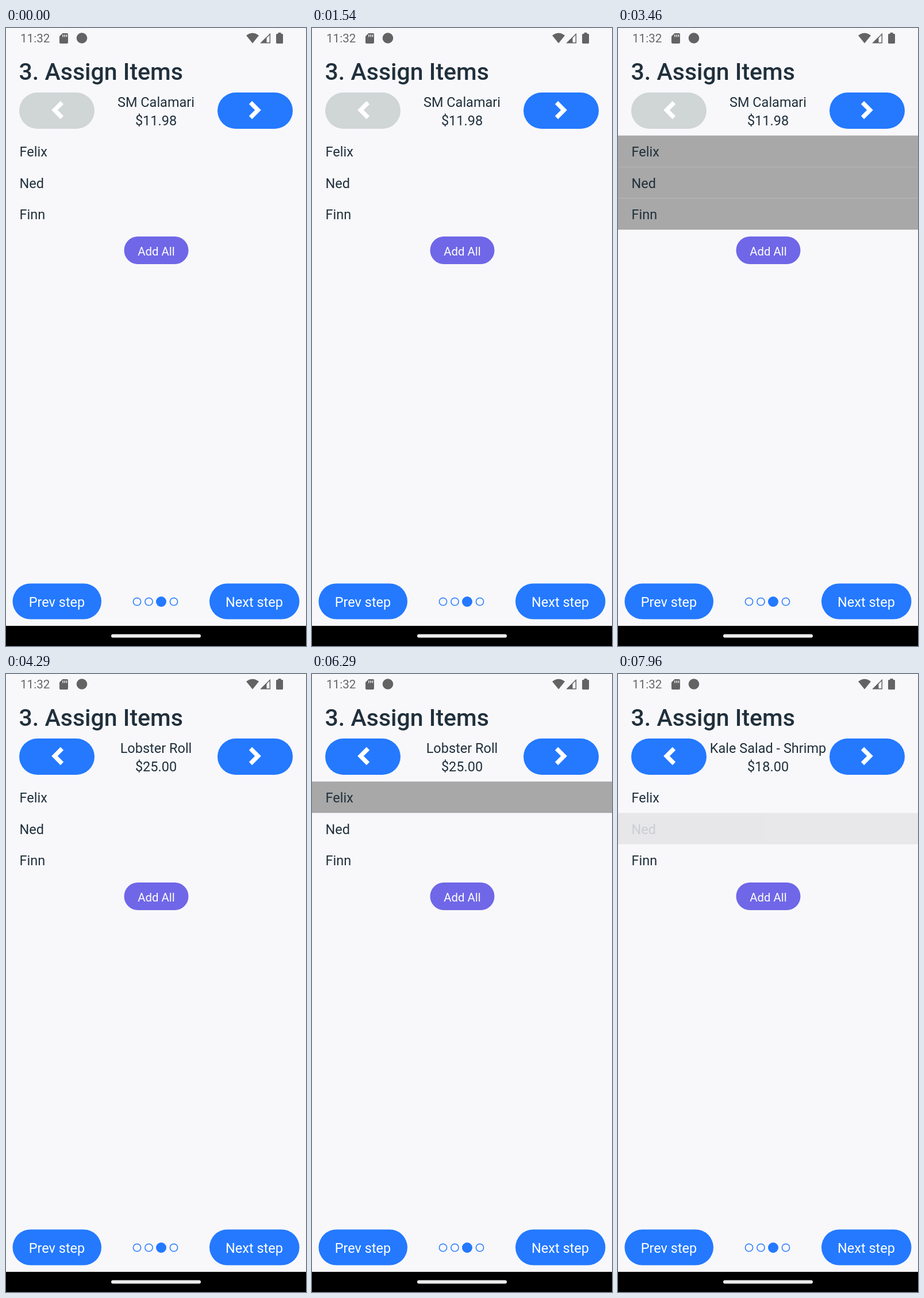
An HTML page that plays this animation: 522 px wide and 1073 px high, repeating every 8 s.

```html
<!DOCTYPE html>
<html lang="en">
<head>
<meta charset="utf-8">
<title>Assign Items</title>
<style>
  html, body { margin: 0; width: 100%; height: 100%; overflow: hidden; background: #f8f8fb; }
  svg { display: block; width: 100%; height: 100%; }
  text { font: 23.5px Roboto, Arial, sans-serif; fill: #20303c; }
  .title { font-size: 41px; font-weight: 500; }
  .clock { font-size: 20.6px; fill: #666; }
  .mid { text-anchor: middle; }
  .light { fill: #fff; }
  .small { font-size: 20.4px; }
  .blue { fill: #2479ff; }
  .chevron { fill: none; stroke: #fff; stroke-width: 7.5; }
  .status { fill: #636363; }
  .ring { fill: none; stroke: #2479ff; stroke-width: 1.5; }
</style>
</head>
<body>
<svg viewBox="0 0 522 1073">
  <rect width="522" height="1073" fill="#f8f8fb"/>

  <g class="status">
    <text class="clock" x="25" y="25">11:32</text>
    <path d="M98.5 9H106a2 2 0 0 1 2 2V25a2 2 0 0 1-2 2H95a2 2 0 0 1-2-2V14.500Z"/>
    <path d="M99 11.500v4M102.300 11.500v4M105.500 11.500v4" stroke="#f8f8fb" stroke-width="1.5"/>
    <circle cx="132" cy="17.500" r="9.300"/>
    <path d="M418 13Q429 4.500 440 13L429 26.500Z"/>
    <path d="M459.300 10.500V25.700H444Z" fill="none" stroke="#636363" stroke-width="1.5"/>
    <path d="M443 26L453.500 15.500V26Z"/>
    <path d="M473.500 8h5v2h2a1.500 1.500 0 0 1 1.500 1.500V25.500a1.500 1.500 0 0 1-1.500 1.500h-9a1.500 1.500 0 0 1-1.500-1.500V11.500a1.500 1.500 0 0 1 1.500-1.500h2Z"/>
  </g>

  <text class="title" x="22.500" y="90">3. Assign Items</text>

  <rect id="back" x="23" y="112" width="131" height="63" rx="31.500"/>
  <path class="chevron" d="M97.500 129.500l-13 13l13 13"/>
  <rect class="blue" x="368" y="112" width="131" height="63" rx="31.500"/>
  <path class="chevron" d="M425.500 129.500l13 13l-13 13"/>
  <text id="item" class="mid" x="261" y="137"></text>
  <text id="price" class="mid" x="261" y="168.500"></text>

  <g id="rows"></g>

  <rect x="205.500" y="362" width="112" height="48" rx="24" fill="#6f67e7"/>
  <text class="mid light small" x="261.500" y="394.500">Add All</text>

  <rect class="blue" x="11.500" y="964.500" width="154.500" height="62" rx="31"/>
  <text class="mid light" x="88.500" y="1005">Prev step</text>
  <rect class="blue" x="354" y="964.500" width="156.500" height="62" rx="31"/>
  <text class="mid light" x="432" y="1005">Next step</text>

  <circle class="ring" cx="228" cy="996" r="6.600"/>
  <circle class="ring" cx="248.500" cy="996" r="6.600"/>
  <circle class="blue" cx="270" cy="996" r="9"/>
  <circle class="ring" cx="292" cy="996" r="6.600"/>

  <rect y="1038" width="522" height="35"/>
  <rect x="183" y="1052.500" width="156" height="6" rx="3" fill="#ececec"/>
</svg>
<script>
  const LOOP = 8000, FADE_IN = 150, FADE_OUT = 250, DIM = 0.2;
  const PEOPLE = ['Felix', 'Ned', 'Finn'];

  // State of the page from each moment on
  const STATES = [
    { at: 0, item: 'SM Calamari', price: '$11.98', first: true, picked: [] },
    { at: 2050, item: 'SM Calamari', price: '$11.98', first: true, picked: [0, 1, 2] },
    { at: 4000, item: 'Lobster Roll', price: '$25.00', picked: [] },
    { at: 5142, item: 'Lobster Roll', price: '$25.00', picked: [0] },
    { at: 7050, item: 'Kale Salad - Shrimp', price: '$18.00', picked: [] },
    { at: 7945, item: 'Kale Salad - Shrimp', price: '$18.00', picked: [1] }
  ];

  // Finger release per row
  const TAPS = [{ row: 0, at: 5142 }, { row: 1, at: 7945 }];

  const $ = id => document.getElementById(id);

  function add(parent, tag, attrs) {
    const el = document.createElementNS('http://www.w3.org/2000/svg', tag);
    for (const key in attrs) el.setAttribute(key, attrs[key]);
    return parent.appendChild(el);
  }

  const rows = PEOPLE.map((name, i) => {
    const group = add($('rows'), 'g', {});
    const top = 186.7 + i * 54.5;
    const fill = add(group, 'rect', { y: top, width: 522, height: 54.5, fill: '#a8a8a8' });
    add(group, 'text', { x: 23.5, y: top + 36.5 }).textContent = name;
    return { group, fill };
  });

  const ease = p => p < 0.5 ? 2 * p * p : 1 - 2 * (1 - p) * (1 - p);

  function rowOpacity(row, time) {
    const tap = TAPS.find(t => t.row === row);
    if (!tap) return 1;
    const d = time - tap.at;
    if (d <= -FADE_IN || d >= FADE_OUT) return 1;
    return d < 0
      ? 1 - (1 - DIM) * ease(1 + d / FADE_IN)
      : DIM + (1 - DIM) * ease(d / FADE_OUT);
  }

  let shown;
  function showState(state) {
    if (state === shown) return;
    shown = state;
    $('item').textContent = state.item;
    $('price').textContent = state.price;
    $('back').setAttribute('fill', state.first ? '#d0d5d6' : '#2479ff');
    rows.forEach((r, i) => r.fill.setAttribute('visibility', state.picked.includes(i) ? 'visible' : 'hidden'));
  }

  function draw() {
    const time = performance.now() % LOOP;
    showState(STATES.filter(s => s.at <= time).pop());
    rows.forEach((r, i) => r.group.setAttribute('opacity', rowOpacity(i, time)));
    requestAnimationFrame(draw);
  }
  draw();
</script>
</body>
</html>
```
